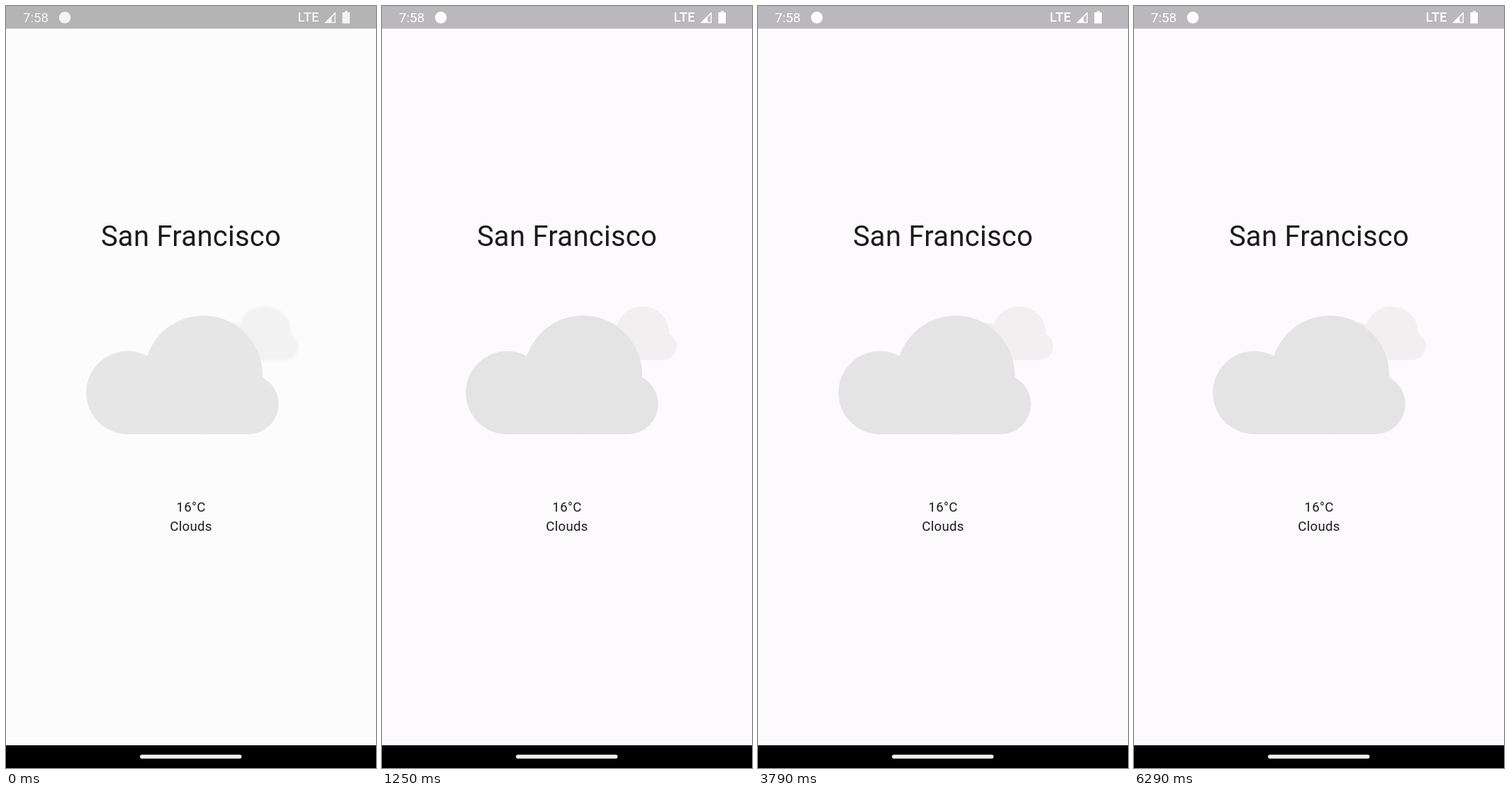
These frames come from a looping animation (522 px wide and 1073 px high, 6410 ms). An HTML page:

```html
<!DOCTYPE html>
<html lang="en">
<head>
<meta charset="utf-8">
<title>Weather</title>
<style>
  html, body { margin: 0; width: 100%; height: 100%; overflow: hidden; background: #fcfafd; }
  svg { display: block; width: 100%; height: 100%; font: 18.6px Roboto, sans-serif; }
  #page { fill: #fcfafd; }
  #bar { fill: #bab8bc; }
  #near { fill: #e4e4e5; }
  #far { fill: #f2eff1; }
  .soft #page { fill: #fcfcfd; }
  .soft #bar { fill: #b4b4b4; }
  .soft #near { fill: #e6e6e6; }
  .soft #far { fill: #f2f2f2; filter: blur(3px); }
  .soft #status { opacity: .85; }
  .label { fill: #1b1b1f; text-anchor: middle; letter-spacing: .332px; }
  .title { font-size: 39.87px; }
</style>
</head>
<body>
<svg id="stage" viewBox="0 0 522 1073">
  <defs>
    <g id="cloud">
      <circle cx="-.8" cy=".6" r="83.6"/>
      <circle cx="-107.5" cy="25.5" r="58.5"/>
      <circle cx="63" cy="41.5" r="42.5"/>
      <path d="M-107.5 25.5H63V84H-107.5z"/>
    </g>
  </defs>
  <rect id="page" width="522" height="1073"/>
  <rect id="bar" width="522" height="31.900"/>
  <g id="status" fill="#fff">
    <text x="24" y="23">7:58</text>
    <circle cx="83" cy="16.3" r="8.3"/>
    <text x="411.5" y="22.3" font-weight="500">LTE</text>
    <path fill-rule="evenodd" d="M449 24L465 8V24zM459.5 22.5H463.5V12L459.5 16z"/>
    <path d="M478 7h4v2h3v15.500h-10.500v-15.500h3.500z"/>
  </g>
  <use id="far" href="#cloud"/>
  <use id="near" href="#cloud"/>
  <text class="label title" x="261" y="338">San Francisco</text>
  <text class="label" x="261" y="712">16°C</text>
  <text class="label" x="261" y="739">Clouds</text>
  <rect y="1041" width="522" height="32"/>
  <rect x="189" y="1054.300" width="143.500" height="5.400" rx="2.700" fill="#f0eef0"/>
</svg>
<script>
const LOOP = 6410, SWAY = 1510;
const byId = id => document.getElementById(id);
const stage = byId('stage'), near = byId('near'), far = byId('far');

// Swings between 0 and 1, reaching 1 at the peak time
const swing = (t, peak) => (1 + Math.cos(2 * Math.PI * (t - peak) / SWAY)) / 2;

function draw(now) {
  const t = now % LOOP;
  const nearX = 277.2 + 8 * swing(t, 2640) ** 2; // squared: lingers on the left
  const farX = 363.8 + 6 * swing(t, 2480);
  stage.setAttribute('class', t < 130 ? 'soft' : '');
  near.setAttribute('transform', `translate(${nearX} 519)`);
  far.setAttribute('transform', `translate(${farX} 460.5) scale(.452)`);
}

const start = performance.now();
function tick() {
  draw(performance.now() - start);
  requestAnimationFrame(tick);
}
tick();
</script>
</body>
</html>
```
